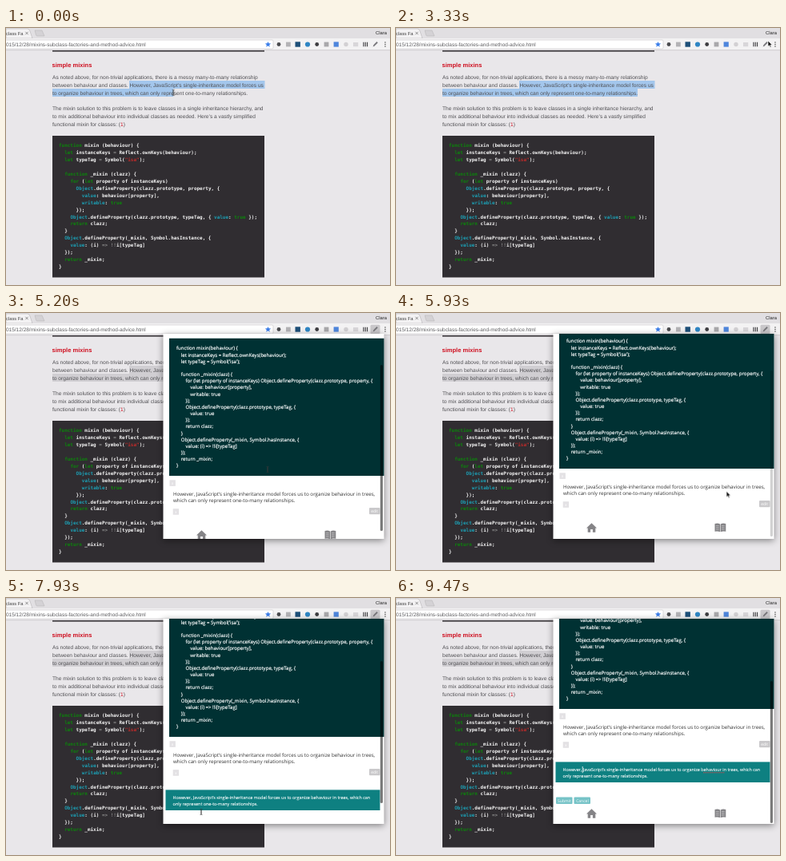
Animation of 480x322 px, one loop 9.54 s. Source, as an HTML page:

```html
<!DOCTYPE html>
<html lang="en">
<head>
<meta charset="utf-8">
<title>Saving a selection</title>
<style>
html, body { margin: 0; width: 100%; height: 100%; overflow: hidden; background: #e9e7ea; }
svg { display: block; width: 100%; height: 100%; }
text { font-family: "Liberation Sans", Arial, sans-serif; text-rendering: geometricPrecision; white-space: pre; }
.body { font-size: 6.63px; fill: #515054; }
.red { fill: #cf1020; }
.code text { font: bold 5.98px "DejaVu Sans Mono", monospace; fill: #f4f4f4; }
.code .kw { fill: #0c850c; }
.code .key { fill: #1c9fb4; }
.code .str { fill: #c22a2a; }
.code .op { fill: #8a8a8a; }
.menu text { font-size: 6.15px; fill: #1c1c1c; }
.card text { font-family: "Open Sans", sans-serif; }
.snippet text { font-size: 6.09px; fill: #fff; stroke: #fff; stroke-width: .16px; }
.note { font-size: 6.24px; fill: #333; }
.draft { font-size: 5.44px; fill: #fff; stroke: #fff; stroke-width: .1px; }
.tiny { font-size: 5px; fill: #fff; }
.menu, .pop { filter: drop-shadow(0 2px 4px rgba(0,0,0,.45)); }

.sel, .row2, .menu, .hot, .hotText, .pop, .press, .scroll, .foot, .edit,
.thumb, .focus, .ptr, .arrow, .beam { animation: 9540ms linear infinite; }
.sel, .menu, .hot, .hotText, .pop, .press, .foot, .focus, .arrow, .beam { animation-timing-function: step-end; }

.sel { animation-name: sel; }
@keyframes sel { 0% { fill: #a3c6ec } 37.74%, 100% { fill: #d0ced2 } }
.row2 { animation-name: row2; }
@keyframes row2 { 0% { width: 151px } 5.24%, 100% { width: 244px } }
.menu { animation-name: menu; }
@keyframes menu { 0% { opacity: 0 } 11.53% { opacity: 1 } 22.54%, 100% { opacity: 0 } }
.hot { animation-name: hot; }
@keyframes hot { 0% { opacity: 0 } 18.87%, 100% { opacity: 1 } }
.menu .hotText { animation-name: hotText; }
@keyframes hotText { 0% { fill: #1c1c1c } 18.87%, 100% { fill: #fff } }
.press { animation-name: press; }
@keyframes press { 0% { opacity: 0 } 35.64%, 100% { opacity: 1 } }
.pop { animation-name: pop; }
@keyframes pop { 0% { opacity: 0 } 37.74%, 100% { opacity: 1 } }
.scroll { animation-name: scroll; }
@keyframes scroll {
  0%, 46.12% { transform: translateY(49px) }
  54.51% { transform: none }
  57.65%, 78.62% { transform: translateY(-9px) }
  83.12% { transform: translateY(-30px) }
  93.29%, 100% { transform: translateY(-65px) }
}
.thumb { animation-name: thumb; }
@keyframes thumb {
  0%, 45.07% { opacity: 0; height: 208px; transform: none }
  46.12% { opacity: 1; height: 208px; transform: none }
  54.51% { opacity: 1; height: 208px; transform: translateY(39px) }
  57.65%, 60.8% { opacity: 1; height: 208px; transform: translateY(46px) }
  62.89% { opacity: 0; height: 208px; transform: translateY(46px) }
  70.23%, 77.57% { opacity: 0; height: 178px; transform: translateY(40px) }
  78.62% { opacity: 1; height: 178px; transform: translateY(40px) }
  83.12% { opacity: 1; height: 178px; transform: translateY(53px) }
  93.29%, 100% { opacity: 1; height: 178px; transform: translateY(78px) }
}
.foot { animation-name: foot; }
@keyframes foot { 0% { transform: none } 70.23%, 100% { transform: translateY(57px) } }
.edit { animation-name: edit; }
@keyframes edit { 0%, 70.23% { opacity: 0 } 73.38% { opacity: .6 } 75.47%, 100% { opacity: 1 } }
.focus { animation-name: focus; }
@keyframes focus { 0% { opacity: 0 } 94.34%, 100% { opacity: 1 } }
.ptr { animation-name: ptr; }
@keyframes ptr {
  0% { transform: translate(209px, 81px) }
  5.24% { transform: translate(302px, 81px) }
  10.48%, 11.53% { transform: translate(273px, 75px); animation-timing-function: ease-in-out }
  19.39% { transform: translate(291px, 142px) }
  20.96%, 23.06% { transform: translate(293px, 146px); animation-timing-function: ease-in-out }
  31.45% { transform: translate(452px, 34px) }
  34.91%, 40.88% { transform: translate(465px, 16px); animation-timing-function: ease-in-out }
  46.12%, 56.6% { transform: translate(327px, 196px); animation-timing-function: ease-in-out }
  66.04%, 70.23% { transform: translate(459px, 238px); animation-timing-function: ease-in-out }
  73.38% { transform: translate(425.5px, 234px); animation-timing-function: ease-in-out }
  83.12%, 88.05% { transform: translate(244px, 268px); animation-timing-function: ease-in-out }
  94.34%, 100% { transform: translate(233px, 215px) }
}
.arrow { animation-name: arrow; }
@keyframes arrow {
  0% { opacity: 0 } 10.48% { opacity: 1 } 45.07% { opacity: 0 }
  61.84% { opacity: 1 } 78.62%, 100% { opacity: 0 }
}
.beam { animation-name: beam; }
@keyframes beam {
  0% { opacity: 1 } 10.48% { opacity: 0 } 45.07% { opacity: 1 }
  61.84% { opacity: 0 } 78.62% { opacity: 1 } 94.34%, 100% { opacity: 0 }
}
</style>
</head>
<body>
<svg viewBox="0 0 480 322" preserveAspectRatio="none">
  <defs>
    <clipPath id="view"><rect x="196.5" y="26" width="276" height="257"/></clipPath>
  </defs>
  <rect width="480" height="322" fill="#e9e7ea"/>

  <!-- page -->
  <rect x="58" y="28" width="265" height="1.6" fill="#322f33"/>
  <g class="sel">
    <rect x="154" y="66" width="169.5" height="10"/>
    <rect class="row2" x="58" y="76" width="244" height="10"/>
  </g>
  <text class="red" x="57.5" y="49" font-size="7.56" font-weight="bold">simple mixins</text>
  <g class="body">
    <text x="58" y="63.5">As noted above, for non-trivial applications, there is a messy many-to-many relationship</text>
    <text x="58" y="73.6">between behaviour and classes. However, JavaScript’s single-inheritance model forces us</text>
    <text x="58" y="83.7">to organize behaviour in trees, which can only represent one-to-many relationships.</text>
    <text x="58" y="102.7">The mixin solution to this problem is to leave classes in a single inheritance hierarchy, and</text>
    <text x="58" y="113">to mix additional behaviour into individual classes as needed. Here’s a vastly simplified</text>
    <text x="58" y="123.2">functional mixin for classes: (<tspan class="red">1</tspan>)</text>
  </g>
  <rect x="58" y="135" width="265" height="177.5" fill="#302d31"/>
  <g class="code" id="code"></g>

  <!-- browser bar -->
  <rect width="480" height="13" fill="#e1dfe2"/>
  <path d="M0 1H27Q29 1 30 4L33 13H0Z" fill="#f3f2f3" stroke="#b5b3b6" stroke-width=".6"/>
  <path d="M36 3H45L48 10H39Q38 10 37.5 9Z" fill="#d4d2d5" stroke="#b2b0b3" stroke-width=".5"/>
  <text x="0" y="9" font-size="5.8" fill="#444">class Fa</text>
  <path d="M24.3 4.8l3.4 3.4m0-3.4l-3.4 3.4" stroke="#666" stroke-width=".7"/>
  <text x="462" y="8.4" font-size="5.8" fill="#222">Clara</text>
  <rect y="13" width="480" height="14.5" fill="#f3f2f3"/>
  <path d="M0 27.7H480" stroke="#b9b7ba" stroke-width=".6"/>
  <rect x="-4" y="15" width="338" height="11" rx="1.5" fill="#fff" stroke="#c6c4c7" stroke-width=".6"/>
  <text x="0" y="22.6" font-size="6.49" fill="#5e5e61">015/12/28/mixins-subclass-factories-and-method-advice.html</text>
  <path d="M327.5 16.9l1 2.4 2.6.2-2 1.7.7 2.5-2.3-1.4-2.3 1.4.7-2.5-2-1.7 2.6-.2z" fill="#3b7de9"/>
  <circle cx="341" cy="20.5" r="2.4" fill="#4a4b4e"/>
  <rect x="350" y="17.6" width="5.8" height="5.8" fill="#b4b3b6"/>
  <rect x="361.5" y="17.3" width="6.4" height="6.4" fill="#1d4f78"/>
  <circle cx="377" cy="20.5" r="3.1" fill="#2f86c4"/>
  <circle cx="388.7" cy="20.5" r="2.4" fill="#3d3d40"/>
  <rect x="397.6" y="17.6" width="5.8" height="5.8" fill="#a9a8ab"/>
  <rect x="409.6" y="17.4" width="6.2" height="6.2" fill="#4f86dc"/>
  <circle cx="425" cy="20.5" r="2.7" fill="#d2d0d3"/>
  <rect x="434" y="18" width="6.2" height="5.2" fill="#d8d6d9"/>
  <path d="M447 17.8v5.4m2.3-5.4v5.4m2.3-5.4v5.4" stroke="#3a3a3c" stroke-width="1.1"/>
  <rect class="press" x="455.5" y="14.7" width="12" height="11.6" rx="1.5" fill="#c9c7ca"/>
  <path d="M458.6 23.4l1-2.4 3.9-3.9 1.3 1.3-3.9 3.9z" fill="#77767a"/>
  <g fill="#555"><circle cx="474" cy="18" r=".8"/><circle cx="474" cy="20.5" r=".8"/><circle cx="474" cy="23" r=".8"/></g>

  <!-- context menu -->
  <g class="menu">
    <rect x="273" y="74.5" width="214" height="121" rx="2" fill="#f1f0f1" stroke="#bdbbbe" stroke-width=".5"/>
    <path d="M273 87H480M273 117H480M273 157H480M273 170.3H480M273 183.8H480" stroke="#d9d7da" stroke-width=".8"/>
    <rect class="hot" x="273" y="137.3" width="207" height="8.7" fill="#3f96f7"/>
    <text x="282" y="82.4">Look Up “However, JavaScript’s single-inheritance model…”</text>
    <text x="282" y="95.6">Copy</text>
    <text x="282" y="103.6">Search Quoble for “However, JavaScript’s single-inheritance model…”</text>
    <text x="282" y="111.9">Print...</text>
    <rect x="282" y="120.6" width="6" height="6" fill="#4b87df"/>
    <text x="290.5" y="125.6">Quoble Translate</text>
    <circle cx="285" cy="132" r="2.8" fill="#6d4d9c"/>
    <text x="290.5" y="134.2">Redux DevTools</text>
    <rect x="282" y="138.8" width="6" height="6" fill="#e3b33c"/>
    <text class="hotText" x="290.5" y="143.8">Save selection to Tuck</text>
    <path d="M282.6 153.2l1-2.4 3.4-3.4 1.3 1.3-3.4 3.4z" fill="#666"/>
    <text x="290.5" y="152.7">Take Note</text>
    <text x="282" y="165.8">Inspect</text>
    <text x="282" y="179.1">Speech</text>
    <text x="282" y="192.4">Add to Zolune as a Spoken Track</text>
    <path d="M474.5 129.8l3.4 2.2-3.4 2.2zM474.5 174.8l3.4 2.2-3.4 2.2z" fill="#333"/>
  </g>

  <!-- extension popup -->
  <g class="pop">
    <rect x="196.5" y="26" width="276" height="257" fill="#fff"/>
    <g class="card" clip-path="url(#view)">
      <g class="scroll">
        <rect x="204" y="31.8" width="268.5" height="172.2" fill="#003133"/>
        <g class="snippet" id="snippet"></g>
        <rect x="204.5" y="209.3" width="7.4" height="7.6" fill="#e3e1e4"/>
        <text class="tiny" x="206.8" y="214.9">x</text>
        <text class="note" x="209" y="229.2">However, JavaScript’s single-inheritance model forces us to organize behaviour in trees,</text>
        <text class="note" x="209" y="237.4">which can only represent one-to-many relationships.</text>
        <rect x="208.7" y="245.2" width="7.4" height="7.6" fill="#e3e1e4"/>
        <text class="tiny" x="211" y="250.8">x</text>
        <rect x="454" y="244" width="13.5" height="8.2" rx="1" fill="#cac9cb"/>
        <text class="tiny" x="456.2" y="249.9">edit</text>
        <g class="edit">
          <rect x="199.5" y="270.4" width="268" height="25.6" fill="#0e8081"/>
          <text class="draft" x="208.6" y="282">However, JavaScript’s single-inheritance model forces us to organize behaviour in trees, which can</text>
          <text class="draft" x="208.6" y="289.8">only represent one-to-many relationships.</text>
          <g class="focus">
            <path d="M233.2 276v8.2" stroke="#fff" stroke-width=".8"/>
            <path d="M384 283.8H411" stroke="#e0484c" stroke-width=".9" stroke-dasharray="1.2 .6"/>
          </g>
          <rect x="200" y="314.5" width="20.5" height="8.6" rx="1" fill="#76c3c7"/>
          <text class="tiny" x="202.1" y="320.5">Submit</text>
          <rect x="222.5" y="314.5" width="20.5" height="8.6" rx="1" fill="#76c3c7"/>
          <text class="tiny" x="225.2" y="320.5">Cancel</text>
        </g>
        <g class="foot">
          <path d="M238 278.4l6.5-6.2 6.5 6.2h-1.7v5.4h-3.4v-3.8h-2.8v3.8h-3.4v-5.4z" fill="#858487"/>
          <path d="M398.5 273q4-1.2 6.6.6v9.6q-3-1.4-6.6-.4zM412.3 273q-4-1.2-6.6.6v9.6q3-1.4 6.6-.4z" fill="#858487"/>
          <path d="M400 275.6h3.6m-3.6 2.2h3.6m-3.6 2.2h3.6m3.4-4.4h3.6m-3.6 2.2h3.6m-3.6 2.2h3.6" stroke="#d9d8da" stroke-width=".6"/>
        </g>
      </g>
      <rect class="thumb" x="467.8" y="26" width="3.2" height="208" rx="1.6" fill="#000" fill-opacity=".52"/>
    </g>
  </g>

  <!-- pointer -->
  <g class="ptr">
    <path class="arrow" d="M0 0V7.2L1.7 5.7 2.8 8.2 4 7.7 2.9 5.3H5.2Z" fill="#111" stroke="#fff" stroke-width=".6"/>
    <path class="beam" d="M-1.4-3.6Q0-3.6 0-2.7V2.7Q0 3.6-1.4 3.6M1.4-3.6Q0-3.6 0-2.7V2.7Q0 3.6 1.4 3.6" fill="none" stroke="#3a3a3a" stroke-width=".7"/>
  </g>
</svg>
<script>
const pageCode = `function mixin (behaviour) {
  let instanceKeys = Reflect.ownKeys(behaviour);
  let typeTag = Symbol("isa");

  function _mixin (clazz) {
    for (let property of instanceKeys)
      Object.defineProperty(clazz.prototype, property, {
        value: behaviour[property],
        writable: true
      });
    Object.defineProperty(clazz.prototype, typeTag, { value: true });
    return clazz;
  }
  Object.defineProperty(_mixin, Symbol.hasInstance, {
    value: (i) => !!i[typeTag]
  });
  return _mixin;
}`;

const noteCode = `function mixin(behaviour) {
  let instanceKeys = Reflect.ownKeys(behaviour);
  let typeTag = Symbol('isa');

  function _mixin(clazz) {
    for (let property of instanceKeys) Object.defineProperty(clazz.prototype, property, {
      value: behaviour[property],
      writable: true
    });
    Object.defineProperty(clazz.prototype, typeTag, {
      value: true
    });
    return clazz;
  }
  Object.defineProperty(_mixin, Symbol.hasInstance, {
    value: (i) => !!i[typeTag]
  });
  return _mixin;
}`;

const rules = [
  ["kw", /^(function|let|for|return|true)$/],
  ["key", /^(Object|value|writable)$/],
  ["str", /^"/],
  ["op", /^(=>|!!|=)$/]
];
const splitter = /("\w+"|=>|!!|=|\b(?:function|let|for|return|true|Object|value|writable)\b)/;

function el(parent, tag, attrs, text) {
  const node = document.createElementNS("http://www.w3.org/2000/svg", tag);
  for (const name in attrs) node.setAttribute(name, attrs[name]);
  if (text) node.textContent = text;
  return parent.appendChild(node);
}

function typeset(id, source, { x, y, step, space, colour }) {
  const box = document.getElementById(id);
  source.split("\n").forEach((line, i) => {
    const body = line.trimStart();
    if (!body) return;
    const indent = (line.length - body.length) * space;
    const row = el(box, "text", { x: x + indent, y: y + i * step });
    for (const part of colour ? body.split(splitter) : [body]) {
      const rule = rules.find(([, test]) => test.test(part));
      if (part) el(row, "tspan", colour && rule ? { class: rule[0] } : {}, part);
    }
  });
}

typeset("code", pageCode, { x: 66, y: 149.1, step: 8.94, space: 3.6, colour: true });
typeset("snippet", noteCode, { x: 213, y: 46.4, step: 8.17, space: 2.88, colour: false });
</script>
</body>
</html>
```
